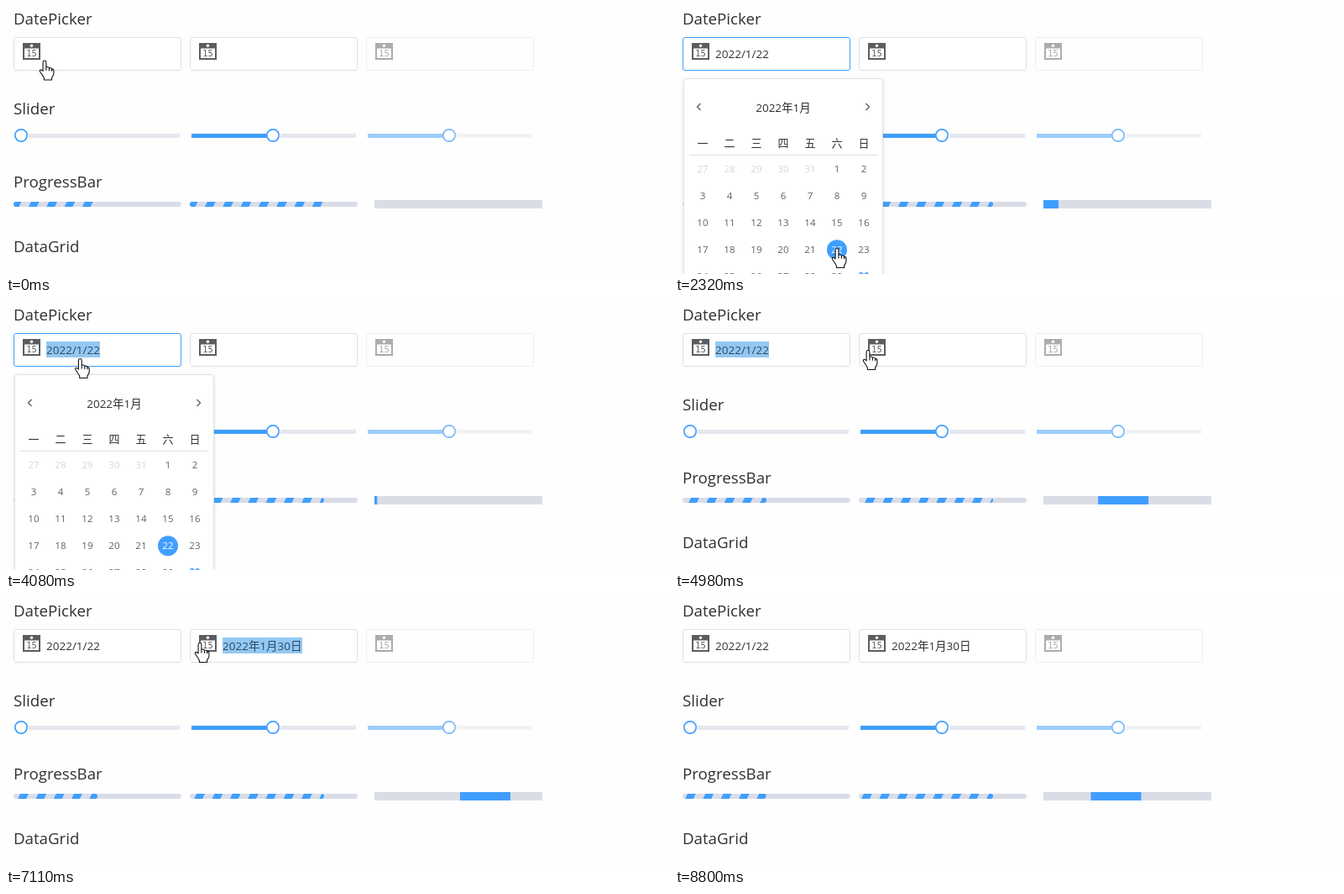
An HTML page for the animation above (8.9 s loop, 790 by 319 pixels).

```html
<!DOCTYPE html>
<html lang="zh-CN">
<head>
<meta charset="utf-8">
<title>Form controls</title>
<style>
  html, body { margin: 0; width: 100%; height: 100%; overflow: hidden; background: #fefefe; }
  svg { display: block; width: 790px; height: 319px; }
  text { font-family: "Open Sans", "Noto Sans CJK SC", "Noto Sans CJK JP", "Noto Sans CJK", sans-serif; fill: #303133; }
  .head { font-size: 18.7px; }
  .value { font-size: 13.5px; }
  .mid { text-anchor: middle; }
  .week { font-size: 13px; }
  .day { font-size: 11.6px; fill: #606266; }
  .day.other { fill: #d6d7da; }
  .day.today { fill: #409eff; font-weight: 700; }
  .day.picked { fill: #fff; }
  .icon { fill: #5c5d60; }
  .icon text { font: 10px "DejaVu Sans", sans-serif; fill: #5c5d60; }
  .box { fill: #fff; stroke: #dcdfe6; }
  .box.open { stroke: #409eff; }
  .rail { fill: #e4e7ed; }
  .track { fill: #dadde6; }
  .blue { fill: #409eff; }
  .thumb { fill: #fff; stroke: #409eff; stroke-width: 1.7; }
  .mark { fill: #93c8f3; opacity: 0; }
  .marked .mark { opacity: 1; }
  .marked text { fill: #2b4a66; }
  .panel { fill: #fff; stroke: #e0e2e8; filter: drop-shadow(0 1px 2px rgba(0, 0, 0, .12)); }
  .rule { stroke: #dcdfe6; }
  .chevron { fill: none; stroke: #606266; stroke-width: 1.4; }
  .hand { fill: #fff; stroke: #111; stroke-width: 1.1; stroke-linejoin: round; }
</style>
</head>
<body>
<svg id="stage" viewBox="0 0 790 319"></svg>
<script>
const LOOP = 8900, SWEEP = 1933, STRIPE = 433.5, PITCH = 21.3;

// Pointer stops: arrival, x, y, rest
const STOPS = [[0, 46, 64.5, 0], [300, 34, 58, 400], [1380, 133, 212, 0], [1950, 193, 288, 450],
  [3130, 33, 71, 600], [4980, 230, 57, 400], [5950, 434, 322, 550], [7110, 231, 53, 400],
  [8250, 560, 200, 0], [8790, 724, 330, LOOP]];

const $ = id => document.getElementById(id);
const text = (cls, x, y, s) => `<text class="${cls}" x="${x}" y="${y}">${s}</text>`;
const rect = (cls, x, y, w, h, rx = 0) =>
  `<rect class="${cls}" x="${x}" y="${y}" width="${w}" height="${h}" rx="${rx}"/>`;
const group = (x, body, attrs = '') => `<g transform="translate(${x})" ${attrs}>${body}</g>`;

function picker(id, x, value, markWidth) {
  return group(x, `${rect('box', .5, 37.5, 199, 39, 2.5)}
    <g class="icon">
      <path fill-rule="evenodd" d="M11 44h21v20h-21zM13 50.5v11.5h17v-11.5z"/>
      <circle cx="21.5" cy="47.2" r="1.7" fill="#fff"/>
      <text class="mid" x="21.5" y="60">15</text>
    </g>
    <g class="entry">${rect('mark', 39, 47, markWidth, 19)}${text('value', 39, 62, value)}</g>`,
    `id="${id}"`);
}

function slider(x, thumb, filled, faded) {
  const bars = rect('rail', thumb + 9, 152, 189 - thumb, 5) +
    (filled ? rect('blue', 2, 152, thumb - 2, 5) : '');
  const ring = faded ? 'style="stroke:#7ab8fb"' : '';
  return group(x, `<g opacity="${faded ? .5 : 1}">${bars}</g>
    <circle class="thumb" cx="${thumb}" cy="154" r="7.2" ${ring}/>`);
}

function striped(id, x, width) {
  let d = '';
  for (let i = -1; i < 9; i++) d += `M${i * PITCH} 239h9.8l2.8-6h-9.8z`;
  return group(x, `<clipPath id="${id}">${rect('', 0, 233, width, 6, 3)}</clipPath>
    ${rect('track', 0, 233, 200, 6, 3)}
    <g clip-path="url(#${id})"><path class="blue stripes" d="${d}"/></g>`);
}

const column = i => 23 + 32 * (i % 7);
const row = i => 32 * Math.floor(i / 7);

function calendar(id, x) {
  let s = rect('panel', .5, 86.5, 237, 270, 3) +
    '<path class="chevron" d="M20.5 116l-4 4 4 4M217.5 116l4 4-4 4"/>' +
    text('value mid', 119, 126, '2022年1月') +
    '<path class="rule" d="M7 177.5h224"/><circle class="blue spot" r="12"/>';
  [...'一二三四五六日'].forEach((c, i) => s += text('week mid', column(i), 168, c));
  for (let i = 0; i < 35; i++) {
    const day = i < 5 ? 27 + i : i - 4;
    const kind = i < 5 ? 'other' : day === 30 ? 'today' : '';
    s += text(`day mid ${kind}`, column(i), 198.3 + row(i), day);
  }
  return group(x, s, `id="${id}"`);
}

const pointer = `<g id="pointer" class="hand">
  <path d="M-1.9 13V2.4a1.9 1.9 0 0 1 3.8 0V8.2Q4.8 7.4 5.4 9.2Q8 8.6 8.6 10.4Q10.9 10.4 10.9 12.6V16
    C10.9 18.6 8.8 19.6 8.6 21.4V23.5H-.6V21.4C-1.2 19.2-3 17.6-5.2 14C-6.6 11.4-4.4 10.2-1.9 13z"/>
  <path d="M1.9 8.2V12.5M5.4 9.2V12.8M8.6 10.4V13.2"/></g>`;

$('stage').innerHTML =
  text('head', 9, 22, 'DatePicker') + text('head', 9, 129, 'Slider') +
  text('head', 9, 216, 'ProgressBar') + text('head', 9, 293, 'DataGrid') +
  picker('first', 9, '2022/1/22', 64) + picker('second', 219, '2022年1月30日', 95) +
  `<g opacity=".5">${picker('third', 429, '', 0)}</g>` +
  slider(9, 9, false, false) + slider(219, 99, true, false) + slider(429, 99, true, true) +
  striped('half', 9, 100) + striped('most', 219, 160) +
  rect('track', 439, 231, 200, 10) + '<rect id="sweep" class="blue" y="231" height="10"/>' +
  calendar('firstDays', 10) + calendar('secondDays', 220) + pointer;

const show = (el, on) => el.style.display = on ? '' : 'none';
const within = (t, a, b) => t >= a && t < b;

function drawPicker(id, t, day, open, filled, marked) {
  const box = $(id), entry = box.querySelector('.entry');
  box.querySelector('.box').classList.toggle('open', open);
  show(entry, filled);
  entry.classList.toggle('marked', marked);

  const days = $(id + 'Days'), spot = days.querySelector('.spot'), cell = day + 4;
  show(days, open);
  show(spot, filled);
  spot.setAttribute('cx', column(cell));
  spot.setAttribute('cy', 194.3 + row(cell));
  days.querySelectorAll('.day')[cell].classList.toggle('picked', filled);
}

function drawProgress(t) {
  const u = Math.max(0, t / SWEEP - .09) % 1;
  const left = -60 + 260 * (u - .065 * Math.sin(2 * Math.PI * u));
  const from = Math.max(0, left), to = Math.min(200, left + 60);
  $('sweep').setAttribute('x', 439 + from);
  $('sweep').setAttribute('width', to - from);

  const shift = (t / STRIPE + .267) % 1 * PITCH - 9;
  document.querySelectorAll('.stripes').forEach(el =>
    el.setAttribute('transform', `translate(${shift})`));
}

function drawPointer(t) {
  const i = STOPS.findLastIndex(stop => t >= stop[0]);
  const [start, x, y, rest] = STOPS[i];
  const [end, nx, ny] = STOPS[i + 1] || STOPS[i];
  const leave = start + rest;
  const k = t > leave ? (t - leave) / (end - leave) : 0;
  $('pointer').setAttribute('transform', `translate(${x + (nx - x) * k} ${y + (ny - y) * k})`);
}

function draw(t) {
  drawProgress(t);
  drawPicker('first', t, 22, within(t, 500, 2440) || within(t, 3530, 4600),
    t >= 2050, within(t, 2440, 5250));
  drawPicker('second', t, 30, within(t, 5250, 6060) || within(t, 7350, 8400),
    t >= 5930, within(t, 6060, 8400));
  drawPointer(t);
}

const begin = performance.now();
function tick() {
  draw((performance.now() - begin) % LOOP);
  requestAnimationFrame(tick);
}
tick();
</script>
</body>
</html>
```
